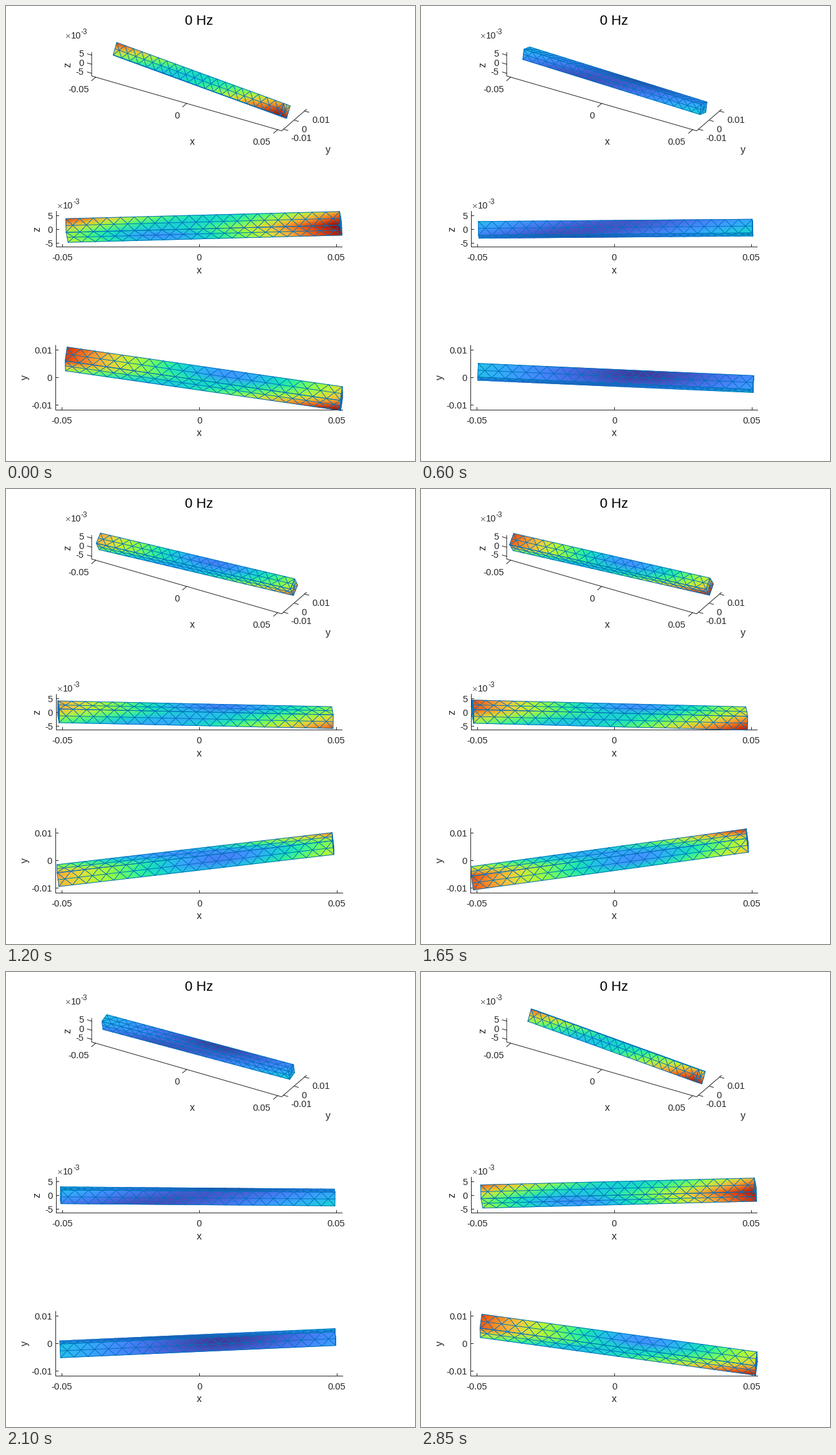
A matplotlib script for the animation above (3000 ms loop, 654 by 728 pixels).

```python
import numpy as np
import matplotlib.pyplot as plt
from matplotlib.animation import FuncAnimation
from matplotlib.collections import LineCollection
from matplotlib.tri import Triangulation

W, H, DPI = 654, 728, 100
FRAMES, INTERVAL = 20, 150
PX = 72 / DPI
INK = (38 / 255,) * 3
EDGE = (0, 114 / 255, 189 / 255)

plt.rcParams["font.family"] = "Liberation Sans"

# Beam size in metres, and its rigid motion: shift plus small rotation
LENGTH, HALF, CELLS = 0.1, 0.0025, 20
SHIFT = np.array([0.0017, -0.00044, 0.00096])
SPIN = np.array([-0.73, -0.0262, -0.144])

XLIM, YLIM, ZLIM = 0.0522, 0.0118, 0.0065


class View:
    """Orthographic projection to stage pixels."""

    def __init__(self, cx, cy, scale, right, up):
        self.center = np.array([cx, cy])
        self.axes = scale * np.array([right, -np.array(up)])

    def __call__(self, pts):
        return self.center + np.asarray(pts) @ self.axes.T


c30, s30 = np.cos(np.pi / 6), 0.5
VIEW_3D = View(308.7, 119.8, 3360, (c30, s30, 0),
               (-s30 * s30, s30 * c30, c30))
VIEW_XZ = View(308.9, 357.7, 4378, (1, 0, 0), (0, 0, 1))
VIEW_XY = View(309, 594.5, 4400, (1, 0, 0), (0, 1, 0))


def side_mesh():
    """Unit square with a staggered middle row of nodes."""
    n = CELLS
    outer = np.arange(n + 1) / n
    middle = np.r_[0, np.arange(n) + 0.5, n] / n
    pts = [(p, q) for row, q in ((outer, 0), (middle, 0.5), (outer, 1))
           for p in row]
    mid = n + 1
    tris = []
    for row in (0, mid + n + 2):
        tris += [(row + i, row + i + 1, mid + i + 1) for i in range(n)]
        tris += [(row + i, mid + i, mid + i + 1) for i in range(n + 1)]
    return np.array(pts), np.array(tris)


def cap_mesh():
    """Unit square as a fan around its centre."""
    ring = [(0, 0), (.5, 0), (1, 0), (1, .5), (1, 1), (.5, 1), (0, 1), (0, .5)]
    tris = [(i, (i + 1) % 8, 8) for i in range(8)]
    return np.array(ring + [(.5, .5)]), np.array(tris)


def make_faces():
    """Each face: rest points, triangles and its two edge vectors (u x v outward)."""
    L, d, h = LENGTH / 2, 2 * HALF, HALF
    ex, ey, ez = np.diag([LENGTH, d, d])
    side, cap = side_mesh(), cap_mesh()
    specs = [
        (side, (-L, -h, -h), ex, ez),
        (side, (-L, h, h), ex, -ez),
        (side, (-L, -h, h), ex, ey),
        (side, (-L, h, -h), ex, -ey),
        (cap, (L, -h, -h), ey, ez),
        (cap, (-L, h, -h), -ey, ez),
    ]
    return [(np.array(o) + uv[:, :1] * u + uv[:, 1:] * v, tris, u, v)
            for (uv, tris), o, u, v in specs]


FACES = make_faces()


def displacement(pts):
    return SHIFT + np.cross(SPIN, pts)


VMAX = max(np.linalg.norm(displacement(f[0]), axis=1).max() for f in FACES)

fig = plt.figure(figsize=(W / DPI, H / DPI), dpi=DPI, facecolor="white")
ax = fig.add_axes([0, 0, 1, 1])
ax.set(xlim=(0, W), ylim=(H, 0))
ax.set_axis_off()
ax.autoscale(False)


def line(*pts):
    xs, ys = zip(*pts)
    ax.plot(xs, ys, color=INK, lw=PX, solid_capstyle="projecting",
            snap=False, zorder=1)


def number(x, y, s, ha="center", size=14.67, color=INK):
    """Text whose digits are centred on y."""
    ax.text(x, y + 0.36 * size, s, ha=ha, va="baseline",
            fontsize=size * PX, color=color)


def name(x, y, s, rotation=0):
    ax.text(x, y, s, ha="center", va="center", rotation=rotation,
            fontsize=16 * PX, color=INK)


def exponent(x, y):
    number(x, y, "×", ha="left", color="0.4")
    number(x + 8.6, y, "10", ha="left")
    number(x + 25, y - 6, "-3", ha="left", size=11.7)


def flat_axes(view, left, right, top, bottom, up, up_labels, label_x):
    line((left, top), (left, bottom), (right, bottom))
    for v, s in ((-0.05, "-0.05"), (0, "0"), (0.05, "0.05")):
        x = view((v, 0, 0))[0]
        tick = np.floor(x + 0.2) + 0.5
        line((tick, bottom), (tick, bottom - 4))
        number(x, bottom + 16.5, s)
    for v, s in up_labels:
        y = np.floor(view(v * np.array(up))[1]) + 0.5
        line((left, y), (left + 4, y))
        number(label_x, y, s, ha="right")
    name(309, bottom + 37.5, "x")


def draw_3d_axes():
    a, b, c = XLIM, YLIM, ZLIM
    line(*VIEW_3D([(-a, -b, c), (-a, -b, -c), (a, -b, -c), (a, b, -c)]))
    tick = 0.0024
    for v in (-0.05, 0, 0.05):
        line(*VIEW_3D([(v, -b, -c), (v, -b - 1.6 * tick, -c)]))
    for v in (-0.01, 0, 0.01):
        line(*VIEW_3D([(a, v, -c), (a + tick, v, -c)]))
    for v in (-0.005, 0, 0.005):
        line(*VIEW_3D([(-a, -b, v), (-a - tick, -b, v)]))

    number(116, 133, "-0.05")
    number(274, 175, "0")
    number(409, 217, "0.05")
    for x, y, s in ((455, 211, "-0.01"), (472, 197, "0"), (489, 182, "0.01")):
        number(x, y, s, ha="left")
    for y, s in ((76, "5"), (90.5, "0"), (105, "-5")):
        number(124.5, y, s, ha="right")
    name(298, 218, "x")
    name(515, 230.5, "y")
    name(99, 94, "z", 90)
    exponent(95, 47)


number(309, 22, "0 Hz", size=22, color="black")
draw_3d_axes()

flat_axes(VIEW_XZ, 80.5, 537.5, 328.5, 385.5, (0, 0, 1),
          ((0.005, "5"), (0, "0"), (-0.005, "-5")), 75)
name(50, 357, "z", 90)
exponent(82, 319)

flat_axes(VIEW_XY, 79.5, 538.5, 543, 646.5, (0, 1, 0),
          ((0.01, "0.01"), (0, "0"), (-0.01, "-0.01")), 73.5)
name(30, 594.5, "y", 90)

drawn = []


def draw_beam(view, amp):
    pts, tris, vals, count = [], [], [], 0
    for rest, face_tris, u, v in FACES:
        # Keep only faces turned to the viewer
        uv = [view.axes @ (e + amp * np.cross(SPIN, e)) for e in (u, v)]
        if np.linalg.det(uv) >= 0:
            continue
        move = amp * displacement(rest)
        pts.append(view(rest + move))
        vals.append(np.linalg.norm(move, axis=1))
        tris.append(face_tris + count)
        count += len(rest)
    pts = np.concatenate(pts)
    mesh = Triangulation(pts[:, 0], pts[:, 1], np.concatenate(tris))
    drawn.append(ax.tripcolor(mesh, np.concatenate(vals), shading="gouraud",
                              cmap="turbo", vmin=0, vmax=VMAX, zorder=2))
    edges = LineCollection(pts[mesh.edges], colors=[EDGE], linewidths=PX,
                           capstyle="round", zorder=3)
    drawn.append(ax.add_collection(edges, autolim=False))


def update(i):
    while drawn:
        drawn.pop().remove()
    amp = np.cos(2 * np.pi * i / FRAMES)
    for view in (VIEW_3D, VIEW_XZ, VIEW_XY):
        draw_beam(view, amp)
    return list(drawn)


anim = FuncAnimation(fig, update, frames=FRAMES, interval=INTERVAL,
                     init_func=lambda: [], repeat=True, repeat_delay=0)
plt.show()
```
